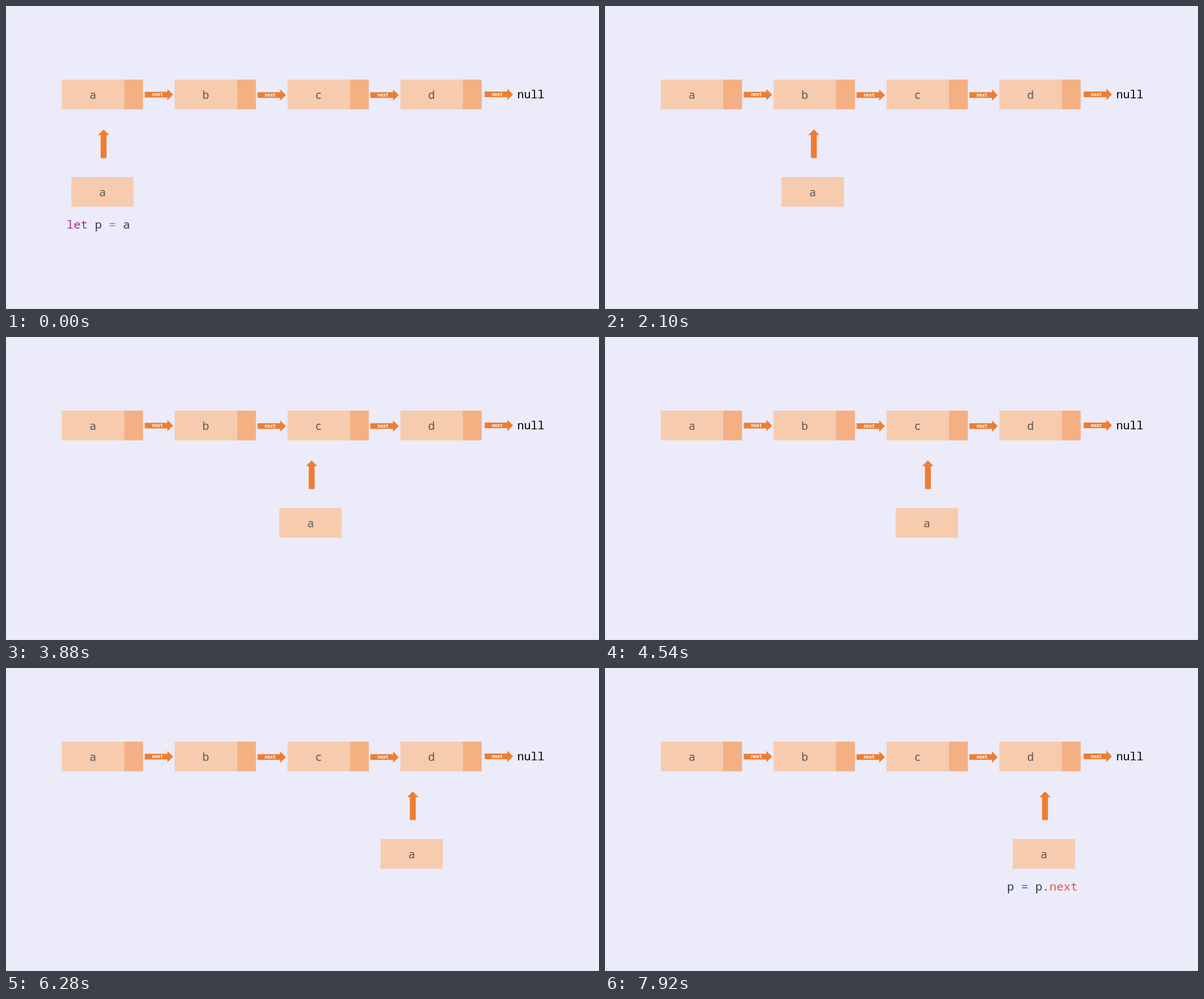
Recreate the animation shown at these times as an HTML page. Size 1048 by 535 pixels, loop 8 s.

```html
<!DOCTYPE html>
<html lang="en">
<head>
<meta charset="utf-8">
<title>Walking a linked list</title>
<style>
  html, body { margin: 0; width: 100%; height: 100%; overflow: hidden; background: #ebebf9; }
  svg { display: block; }
  text { font: 20.8px "Noto Sans Mono", "DejaVu Sans Mono", monospace; fill: #383a42; white-space: pre; }
  .light { fill: #f7cbae; }
  .dark { fill: #f4b083; }
  .arrow { fill: #ef7d31; }
  .name { font-size: 20px; font-weight: 500; fill: #595959; text-anchor: middle; }
  .next { font-size: 8px; font-weight: 700; fill: #fff; text-anchor: middle; }
  .null { font-size: 20px; font-weight: 500; fill: #000; }
  .keyword { fill: #a626a4; }
  .assign { fill: #8c8c97; }
  .operator { fill: #0184bc; }
  .property { fill: #e45649; }
</style>
</head>
<body>
<svg id="stage" width="1048" height="535" viewBox="0 0 1048 535">
  <rect y="534" width="1048" height="1" fill="#dcdbe6"/>
  <g id="list"></g>
  <text class="null" x="903.5" y="163.3">null</text>
  <g id="pointer">
    <path class="arrow" d="M57 218l10 10h-4.8v40.5h-10.4V228H47z"/>
    <rect class="light" y="302" width="110" height="52.3"/>
    <text class="name" x="55" y="335.5">a</text>
  </g>
  <g id="codes"></g>
</svg>
<script>
const LOOP = 8000, MOVE = 2050, FLY = 450, FADE = 500, DROP = 173;
const $ = id => document.getElementById(id);
const clamp = v => Math.min(1, Math.max(0, v));

const node = (name, i) => {
  const x = 98.5 + 199.5 * i;
  return `<rect class="light" x="${x}" y="130" width="110.3" height="52.5"/>
    <rect class="dark" x="${x + 110.3}" y="130" width="33.4" height="52.5"/>
    <text class="name" x="${x + 55}" y="163.5">${name}</text>`;
};
const link = ([x, y]) => `<g transform="translate(${x} ${y})">
    <path class="arrow" d="M0-5H40V-10L50 0L40 10V5H0z"/>
    <text class="next" x="22.3" y="2.9">next</text></g>`;
$('list').innerHTML = [...'abcd'].map(node).join('') +
  [[245.3, 156.5], [444.6, 157.3], [644, 157.3], [846, 156]].map(link).join('');

// Pointer stops, and the time at which each move away from a stop starts
const stops = [115.5, 312.2, 516, 720.6];
const starts = [110, 2775, 5415, Infinity];

const declare = '<tspan class="keyword">let</tspan> p <tspan class="assign">=</tspan> a';
const advance = 'p <tspan class="operator">=</tspan> p.<tspan class="property">next</tspan>';
$('codes').innerHTML = stops.map((x, i) =>
  `<text x="${i ? x - 10 : 107}" y="393">${i ? advance : declare}</text>`).join('');
const codes = [...$('codes').children];

// Cubic Bezier ease (.25, .1, .25, 1)
function ease(u) {
  if (u <= 0 || u >= 1) return clamp(u);
  const curve = (a, b, s) => 3 * a * s * (1 - s) ** 2 + 3 * b * s * s * (1 - s) + s ** 3;
  let lo = 0, hi = 1;
  for (let k = 0; k < 24; k++) {
    const mid = (lo + hi) / 2;
    if (curve(.25, .25, mid) < u) lo = mid; else hi = mid;
  }
  return curve(.1, 1, lo);
}

function draw(t) {
  let x = stops[0];
  for (let i = 0; i < 3; i++) x += (stops[i + 1] - stops[i]) * ease((t - starts[i]) / MOVE);
  $('pointer').setAttribute('transform', `translate(${x} 0)`);

  codes.forEach((code, i) => {
    const arrival = i ? starts[i - 1] + MOVE : -FLY;
    const drop = DROP * (1 - clamp((t - arrival) / FLY));
    code.setAttribute('transform', `translate(0 ${drop})`);
    code.setAttribute('opacity', t < arrival ? 0 : 1 - clamp((t - starts[i]) / FADE));
  });
}

const begin = performance.now();
function frame() {
  draw((performance.now() - begin) % LOOP);
  requestAnimationFrame(frame);
}
frame();
</script>
</body>
</html>
```
